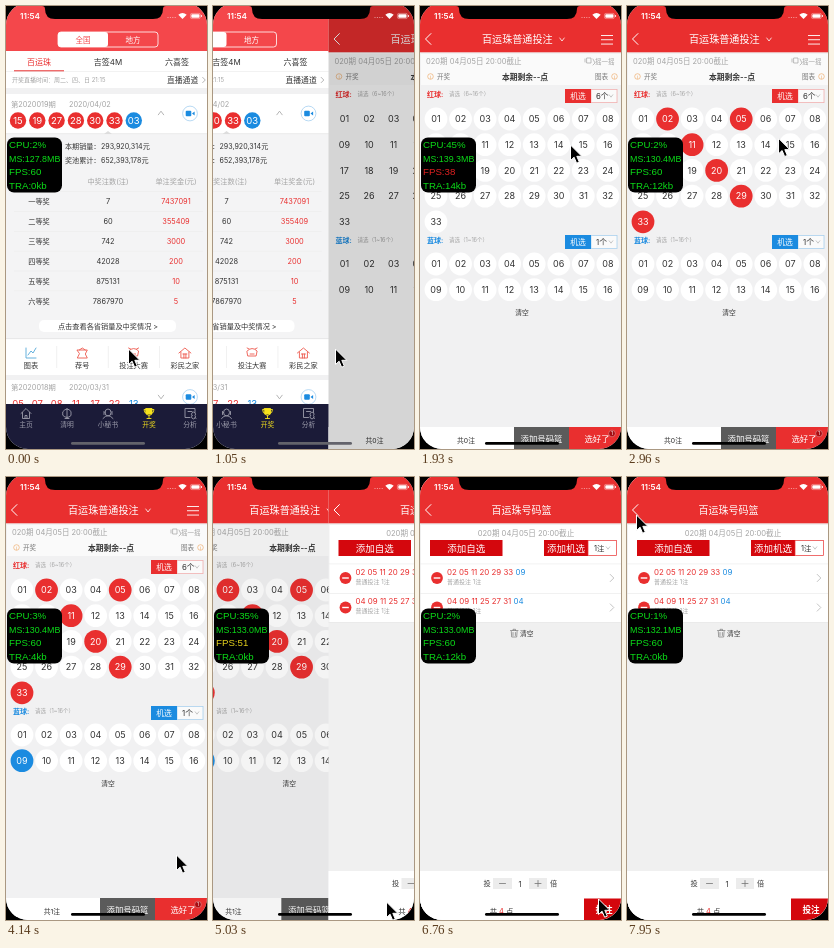
Animation of 201 by 443 pixels, one loop 8 s. Source, as an HTML page:

```html
<!DOCTYPE html>
<html lang="zh">
<head>
<meta charset="utf-8">
<style>
html, body { margin: 0; width: 100%; height: 100%; overflow: hidden; background: #000; }
svg { display: block; width: 100vw; height: 100vh; }
text { font-family: Inter, "Noto Sans CJK SC", "Noto Sans CJK", sans-serif; white-space: pre; }
#hud text { font-family: "Liberation Sans", Arial, sans-serif; }
</style>
</head>
<body>
<svg id="stage" viewBox="0 0 201 443" preserveAspectRatio="none"></svg>
<script>
const LOOP = 8000, WIDTH = 201;
const RED = '#e92f2f', BLUE = '#1b8be0', GREY = '#a3a3a3', INK = '#333', PAPER = '#f1f1f2';
const GAME = '百运珠';

// Drawing helpers
const rect = (x, y, w, h, fill, extra = '') =>
  `<rect x="${x}" y="${y}" width="${w}" height="${h}" fill="${fill}" ${extra}/>`;
const disc = (x, y, r, fill, extra = '') =>
  `<circle cx="${x}" cy="${y}" r="${r}" fill="${fill}" ${extra}/>`;
const text = (x, y, str, size, fill = INK, anchor = 'start', extra = '') =>
  `<text x="${x}" y="${y}" font-size="${size}" fill="${fill}" text-anchor="${anchor}" ${extra}>${str}</text>`;
const mid = (x, y, str, size, fill, extra) => text(x, y, str, size, fill, 'middle', extra);
const line = (d, color, width = 1) =>
  `<path d="${d}" fill="none" stroke="${color}" stroke-width="${width}" stroke-linecap="round" stroke-linejoin="round"/>`;
const chevron = (x, y, dx, dy, color, width = 0.8) => dx
  ? line(`M${x - dx} ${y - dx * 2}L${x + dx} ${y}L${x - dx} ${y + dx * 2}`, color, width)
  : line(`M${x - dy * 1.5} ${y - dy}L${x} ${y + dy}L${x + dy * 1.5} ${y - dy}`, color, width);
const bold = 'font-weight="600"';

const camera = y => disc(184, y, 7.4, '#fff', 'stroke="#a5d0f0" stroke-width=".8"') +
  rect(179.7, y - 2.7, 5.6, 5.4, BLUE, 'rx="1"') + `<path d="M186 ${y}l2.6-2v4z" fill="${BLUE}"/>`;

function drawHeader(title) {
  return rect(0, 0, 205, 46.3, RED) + chevron(8.2, 33, -2.7, 0, '#fff', 1) + title;
}

function drawResults() {
  const tableRows = [['一等奖', '7', '7437091'], ['二等奖', '60', '355409'], ['三等奖', '742', '3000'],
    ['四等奖', '42028', '200'], ['五等奖', '875131', '10'], ['六等奖', '7867970', '5']];
  const drawn = ['15', '19', '27', '28', '30', '33', '03'];
  const earlier = ['05', '07', '08', '11', '17', '22', '13'];
  const icons = {
    chart: 'M-5-5v10h10M-3 2l3-4 2 2 3-5',
    star: 'M-5-3h10l-2 4 2 4h-10l2-4zM-3-3l3-2 3 2',
    cup: 'M-5-2q5-5 10 0l-1 5h-8zM-3-4l-2-1M3-4l2-1M-2 1h4',
    house: 'M-6 0l6-5 6 5M-4-1v6h8v-6M-2 1h4M-1 1v4M1 1v4',
    home: 'M-5 0l5-5 5 5M-3.5-1v6h7v-6M-1 5v-3h2v3',
    lamp: 'M-4-2q4-5 8 0v4q-4 4-8 0zM0-5v10M-2 5h4',
    helper: 'M-3-1a3 3.5 0 1 0 6 0a3 3.5 0 1 0-6 0M-5 5q5-6 10 0M-4-2v3M4-2v3',
    award: 'M-3-5h6v5q-3 4-6 0zM-3-4h-2q0 4 3 4M3-4h2q0 4-3 4M0 2v3M-2 5h4',
    search: 'M5-1v-4h-10v9h5M-2-2h4M2 2a2 2 0 1 0 3 0a2 2 0 1 0-3 0M5 4l1 1'
  };
  const icon = (name, x, y, color) => `<g transform="translate(${x} ${y})">${line(icons[name], color, 0.9)}</g>`;
  let s = rect(0, 0, 205, 443, '#fff') + rect(0, 0, 205, 45, '#f4474b');
  s += rect(52, 26, 100, 15, 'none', 'rx="3" stroke="#fff" stroke-width=".8"') +
    rect(52, 26, 50, 15, '#fff', 'rx="3"') + mid(77, 36.5, '全国', 7.5, '#f4474b') + mid(127, 36.5, '地方', 7.5, '#fff');
  s += mid(33, 58.5, GAME, 8, RED) + mid(102, 58.5, '吉签4M', 8) + mid(171, 58.5, '六喜签', 8);
  s += rect(0, 65, 205, 0.5, '#e4e4e4') + rect(8, 64.3, 50, 1, RED);
  s += text(6, 76, '开奖直播时间：周二、四、日 21:15', 6, GREY) +
    text(161, 77, '直播通道', 7.8) + chevron(198, 74, 1.3, 0, GREY);
  s += rect(0, 82, 205, 6, PAPER);
  s += text(5, 101, '第2020019期', 7.3, GREY) + text(63, 101, '2020/04/02', 7.3, GREY);
  drawn.forEach((n, i) => {
    const x = 12 + 19.3 * i;
    s += disc(x, 114.5, 8.2, i < 6 ? RED : BLUE) + mid(x, 118, n, 9.5, '#fff');
  });
  s += chevron(155, 107, 0, -1.8, GREY) + camera(107.5);
  s += rect(0, 128, 205, 205, '#f4f4f5') + rect(0, 127.5, 205, 0.6, '#ddd') +
    '<path d="M98 128l4-3 4 3z" fill="#ddd"/>';
  s += text(59, 142.5, '本期销量：', 7.1) + text(95, 142.5, '293,920,314元', 7.1) +
    text(59, 156.5, '奖池累计：', 7.1) + text(95, 156.5, '652,393,178元', 7.1);
  s += mid(102, 178, '中奖注数(注)', 7.2, GREY) + mid(170, 178, '单注奖金(元)', 7.2, GREY);
  tableRows.forEach(([rank, count, prize], i) => {
    const y = 198 + 19.9 * i;
    s += mid(33, y, rank, 7.2) + mid(102, y, count, 7.4) + mid(170, y, prize, 7.4, RED) +
      rect(8, y - 12.8, 189, 0.4, '#e6e6e6');
  });
  s += rect(33, 314, 137, 12, '#fff', 'rx="5"') + mid(102, 322.8, '点击查看各省销量及中奖情况 &gt;', 7.2);
  s += rect(0, 332.5, 205, 0.6, '#ddd');
  [['chart', '图表', '#55a9d8'], ['star', '荐号', '#ee5b50'], ['cup', '投注大赛', '#ee5b50'], ['house', '彩民之家', '#ee5b50']]
    .forEach(([name, label, color], i) => {
      const x = 25 + 51.3 * i;
      s += icon(name, x, 347, color) + mid(x, 361.5, label, 7.2);
      if (i) s += rect(x - 25.7, 340, 0.5, 22, '#e2e2e2');
    });
  s += rect(0, 369, 205, 5, PAPER);
  s += text(5, 383.5, '第2020018期', 7.3, GREY) + text(63, 383.5, '2020/03/31', 7.3, GREY);
  earlier.forEach((n, i) => s += mid(12 + 19.3 * i, 401, n, 9.5, i < 6 ? RED : BLUE));
  s += chevron(155, 391, 0, 1.8, GREY) + camera(391);
  s += rect(0, 398, 205, 45, '#1b1b38');
  [['home', '主页'], ['lamp', '清明'], ['helper', '小秘书'], ['award', '开奖'], ['search', '分析']]
    .forEach(([name, label], i) => {
      const x = 20 + 41 * i, color = name === 'award' ? '#f6e21c' : '#9c9cab';
      if (name === 'award') s += rect(x - 3, 402.5, 6, 6, color);
      s += icon(name, x, 407.5, color) + mid(x, 421, label, 6.8, color);
    });
  return s;
}

function drawPicker() {
  const balls = (total, top, kind) => Array.from({ length: total }, (_, i) => {
    const x = 16 + 24.55 * (i % 8), y = top + 25.7 * Math.floor(i / 8), n = String(i + 1).padStart(2, '0');
    return `<g id="${kind}${i + 1}">${disc(x, y, 11.4, '#fff')}${mid(x, y + 3.2, n, 9)}</g>`;
  }).join('');
  const section = (y, label, hint, count, color) =>
    text(7, y + 8, label, 7, color, 'start', bold) + text(29, y + 7, hint, 5.5, GREY) +
    rect(171, y + 0.4, 26, 13.2, '#fafafa', `stroke="${color}" stroke-opacity=".35" stroke-width=".8"`) +
    rect(145, y, 26, 14, color) + mid(158, y + 9.8, '机选', 7.8, '#fff') +
    text(176, y + 9.8, count, 7.8) + chevron(191, y + 7, 0, 1.2, GREY, 0.6);
  const info = x => disc(x, 70.5, 2.8, 'none', 'stroke="#eda35c" stroke-width=".6"') + mid(x, 72.5, 'i', 5, '#eda35c');
  let s = rect(0, 0, 205, 443, PAPER, 'id="pickerPaper"');
  s += drawHeader(text(62, 37, GAME + '普通投注', 10.1, '#fff') + chevron(142, 33.5, 0, 1.5, '#fff'));
  [29, 33.3, 37.6].forEach(y => s += rect(181, y, 12, 0.9, '#fff'));
  s += rect(1, 48, 204, 31, '#fafafa');
  s += text(6, 58, '020期 04月05日 20:00截止', 7.5, GREY);
  s += line('M167 52h4v5h-4zM165 53v3M173 53l2 4-2 2', GREY, 0.7) + text(175, 58, '摇一摇', 6.5, GREY);
  s += info(10.5) + text(17, 73, '开奖', 6.6, '#777') + mid(105, 73.5, '本期剩余--点', 7.8, INK, bold) +
    text(175, 73, '图表', 6.6, '#777') + info(194.5);
  s += section(83, '红球:', '请选（6~16个）', '6个', RED) + balls(33, 113, 'red');
  s += section(229, '蓝球:', '请选（1~16个）', '1个', BLUE) + balls(16, 258, 'blue');
  s += mid(102, 309, '清空', 6.8);
  s += rect(0, 421, 94, 22, '#fff') + mid(46, 436.5, '<tspan id="betCount">共0注</tspan>', 6.8);
  s += rect(94, 421, 55, 22, '#5b5b5b') + mid(121.5, 435.5, '添加号码篮', 8.4, '#fff');
  s += rect(149, 421, 56, 22, RED) + mid(177, 435.5, '选好了', 8.4, '#fff') +
    disc(192, 427.5, 3.3, '#a80d12', 'stroke="#fff" stroke-width=".3"') + mid(192, 429.4, '1', 5, '#fff');
  return s;
}

function drawBasket() {
  const deep = '#d4070d';
  const bet = (y, reds, blue) =>
    disc(17, y + 14, 5.9, RED) + rect(13.7, y + 13.3, 6.6, 1.4, '#fff') +
    text(27, y + 10.5, `${reds} <tspan fill="${BLUE}">${blue}</tspan>`, 7.9, RED) +
    text(27, y + 19.5, '普通投注 1注', 6, GREY) + chevron(192, y + 14, 1.8, 0, '#b5b5b5') +
    rect(0, y + 29, 205, 0.5, '#e3e3e3');
  let s = rect(0, 0, 205, 443, '#f0f0f0') + drawHeader(mid(101.5, 37, GAME + '号码篮', 10, '#fff'));
  s += rect(1, 48, 204, 97, '#fff') + rect(0, 86.7, 205, 0.5, '#e3e3e3');
  s += mid(106, 58.8, '020期 04月05日 20:00截止', 7.6, GREY);
  s += rect(10, 63, 72.5, 16, deep) + mid(46.2, 74.5, '添加自选', 9.5, '#fff');
  s += rect(124, 63, 44, 16, deep) + mid(146, 74.5, '添加机选', 9.5, '#fff');
  s += rect(168, 63.4, 28.6, 15.2, '#fff', `stroke="${RED}" stroke-width=".7"`) +
    text(174, 74, '1注', 7.4) + chevron(188, 71, 0, 1.2, GREY, 0.6);
  s += bet(87, '02 05 11 20 29 33', '09') + bet(116.5, '04 09 11 25 27 31', '04');
  s += line('M90.5 153.5h7.5M93 153.5v-1.2h2.5v1.2M91.3 154.5l.4 5.5h5l.4-5.5M93 155.5v3M95.4 155.5v3', '#777', 0.7) +
    text(100, 159, '清空', 6.8);
  s += rect(0, 394, 205, 49, '#fff');
  s += rect(73, 401, 19, 11, '#ececec') + rect(109, 401, 18, 11, '#ececec') +
    line('M79.5 406.5h6M115 406.5h6M118 403.5v6', '#777', 0.8);
  s += mid(67, 409, '投', 7.2) + mid(100, 409.5, '1', 7.5) + mid(133.5, 409, '倍', 7.2);
  s += mid(81.5, 436.8, `共 <tspan fill="${RED}">4</tspan> 点`, 7.4);
  s += rect(164, 421.5, 41, 22, deep) + mid(184, 436, '投注', 8.6, '#fff', bold);
  return s;
}

function drawDevice() {
  let s = '<path d="M36 0q3 0 3 3q0 10 10 10h98q10 0 10-10q0-3 3-3z"/>';
  s += text(14, 13, '11:54', 8.2, '#fff', 'start', bold);
  for (let i = 0; i < 4; i++) s += disc(162 + 2.4 * i, 11.5, 0.6, '#fff', 'opacity=".6"');
  s += '<path d="M176.5 13l-4.2-4.3q4.2-3.4 8.4 0z" fill="#fff"/>';
  s += rect(184.4, 7.4, 10, 5.2, 'none', 'rx="1.5" stroke="#fff" stroke-opacity=".6" stroke-width=".6"') +
    rect(185.3, 8.2, 8.2, 3.6, '#fff', 'rx=".8"') + rect(195.2, 9, 0.8, 2, '#fff');
  return s + rect(65, 436, 74, 2.8, '#000', 'rx="1.4" id="homeBar"');
}

const $ = id => document.getElementById(id);
const shadeRect = (id, top) => rect(0, top, 205, 443 - top, '#000', `id="${id}" opacity="0"`);
$('stage').innerHTML =
  `<clipPath id="screen">${rect(0, -3, WIDTH, 446, '#fff', 'rx="22"')}</clipPath><g clip-path="url(#screen)">` +
  `<g id="results">${drawResults()}</g>` +
  `<g id="picker">${drawPicker()}${shadeRect('pickerShade', 0)}${shadeRect('pickerUnder', 46.3)}</g>` +
  `<g id="basket">${drawBasket()}</g>${drawDevice()}</g>` +
  `<g id="hud">${rect(1, 131.5, 55, 55, '#000', 'rx="7"')}` +
  [9.7, 8.9, 9.7, 9.7].map((size, i) =>
    text(3, 142 + 13.7 * i, `<tspan id="stat${i}"></tspan>`, size, '#0bdc18')).join('') + '</g>' +
  '<path id="cursor" d="M.5 1v15.5l3.6-3.3 2.5 6 2.7-1.1-2.5-5.8h5z" stroke="#fff" stroke-width="1"/>';

// Moments at which the screen refreshes
const ticks = [0, 150, 1050, 1200, 1350, 1500, 1640, 1790, 1930, 2080, 2220, 2670, 2960, 3110, 3260, 3400, 3700,
  4000, 4140, 4290, 4440, 4890, 5040, 5180, 5330, 5510, 5870, 6020, 6170, 6320, 6460, 6610, 6760,
  7210, 7360, 7650, 7800, 7950];
const cursorPath = [[0, 122, 342], [1350, 122, 342], [1930, 150, 138], [2080, 150, 138], [2220, 150, 96],
  [2810, 150, 96], [3400, 154, 235], [3850, 154, 235], [4140, 170, 377], [4440, 173, 424], [5040, 173, 424],
  [5330, 122, 170], [5510, 110, 109], [5720, 110, 109], [6760, 178, 421], [7060, 178, 421],
  [7210, -40, 200], [7500, -20, -25], [7650, -2, 4], [7800, 5, 24], [7950, 9, 37]];
// time, CPU %, memory MB, frames per second, traffic kb
const stats = [[0, 2, '127.8', 60, 0], [150, 1, '127.8', 60, 12], [1640, 45, '139.3', 38, 14], [2220, 5, '130.4', 60, 0],
  [2960, 2, '130.4', 60, 12], [4000, 3, '130.4', 60, 4], [4890, 35, '133.0', 51, 0], [5870, 3, '133.0', 60, 4],
  [6760, 2, '133.0', 60, 12], [7210, 1, '132.1', 60, 0]];

const latest = (rows, t) => rows.filter(r => r[0] <= t).pop();

function along(keys, t) {
  const i = keys.findIndex(k => k[0] > t);
  if (i < 0) return keys[keys.length - 1].slice(1);
  const a = keys[i - 1], b = keys[i], p = (t - a[0]) / (b[0] - a[0]);
  return a.slice(1).map((v, j) => v + (b[j + 1] - v) * p);
}

// Left edge of an incoming page, settling towards zero
function slideIn(age) {
  const x = 115.5 * Math.exp(-age / 109);
  return age < 0 ? WIDTH : x < 0.6 ? 0 : x;
}

function mark(kind, numbers, on, color) {
  for (const n of numbers) {
    const [ball, label] = $(kind + n).children;
    ball.setAttribute('fill', on ? color : '#fff');
    label.setAttribute('fill', on ? '#fff' : INK);
  }
}

function placePage(id, x) {
  $(id).setAttribute('transform', `translate(${x} 0)`);
  $(id).setAttribute('display', Math.abs(x) >= WIDTH ? 'none' : 'inline');
}

function render(now) {
  const t = ticks.filter(v => v <= now % LOOP).pop();
  const pickerX = slideIn(t - 1050), basketX = slideIn(t - 4890);
  const entering = pickerX > 20;
  placePage('results', (pickerX - WIDTH) * 1.035);
  placePage('picker', pickerX + 0.3 * (basketX - WIDTH));
  placePage('basket', basketX);
  $('pickerPaper').setAttribute('fill', entering ? '#fff' : PAPER);
  $('pickerShade').setAttribute('opacity', 0.165 * Math.min(1, pickerX / 115));
  $('pickerUnder').setAttribute('opacity', 0.1 * (1 - basketX / WIDTH));
  $('homeBar').setAttribute('fill', entering ? '#63636b' : '#000');

  mark('red', [2, 5, 11, 20, 29, 33], t >= 2670, RED);
  mark('blue', [9], t >= 3700, BLUE);
  $('betCount').textContent = t >= 3700 ? '共1注' : '共0注';

  $('hud').setAttribute('display', entering && pickerX < WIDTH ? 'none' : 'inline');
  const [, cpu, memory, fps, traffic] = latest(stats, t);
  [`CPU:${cpu}%`, `MS:${memory}MB`, `FPS:${fps}`, `TRA:${traffic}kb`].forEach((s, i) => $('stat' + i).textContent = s);
  $('stat2').setAttribute('fill', fps < 45 ? '#e02020' : fps < 55 ? '#e6d21c' : '#0bdc18');

  $('cursor').setAttribute('transform', `translate(${along(cursorPath, t)})`);
}

const start = performance.now();
(function frame() {
  render(performance.now() - start);
  requestAnimationFrame(frame);
})();
</script>
</body>
</html>
```
